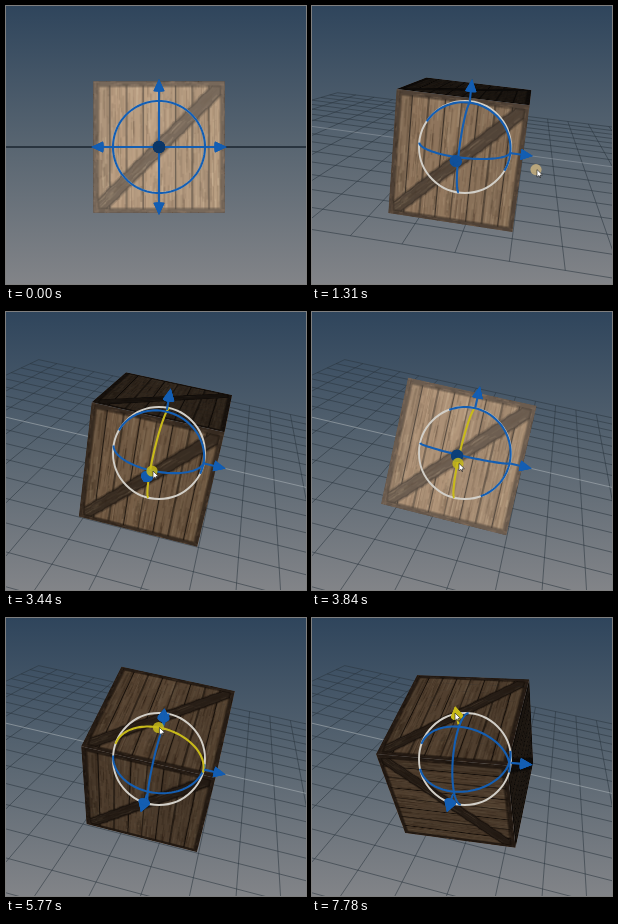
Animation, 300 px wide and 278 px high, one loop 8000 ms. Source, as an HTML page with a canvas:

```html
<!DOCTYPE html>
<html lang="en">
<head>
<meta charset="utf-8">
<title>Crate rotation gizmo</title>
<style>
html, body { margin: 0; width: 100%; height: 100%; overflow: hidden; background: #53616f; }
canvas { display: block; width: 100vw; height: 100vh; }
</style>
</head>
<body>
<canvas id="stage" width="300" height="278"></canvas>
<script>
const W = 300, H = 278, LOOP = 8000;
const CX = 153, CY = 141, FOCAL = 480, DIST = 8.3;
const RING = 46, GRID = 4, CELLS = 8, TEX = 132;
const BLUE = [20, 94, 178], YELLOW = [200, 186, 26], TAN = [200, 176, 126];
const ctx = document.getElementById('stage').getContext('2d');

const DRAGS = [
  { from: 250, to: 1800, color: TAN },
  { from: 3440, to: 4780, color: YELLOW },
  { from: 5770, to: 6700, color: YELLOW }
];
const HOVERS = [
  { from: 2430, to: 2900, part: 'ring1' },
  { from: 2900, to: 4850, part: 'ring0' },
  { from: 5300, to: 7100, part: 'ring2' },
  { from: 7560, to: LOOP, part: 'arrow0' }
];

const rad = d => d * Math.PI / 180;
const dot = (a, b) => a[0] * b[0] + a[1] * b[1] + a[2] * b[2];
const cross = (a, b) => [a[1] * b[2] - a[2] * b[1], a[2] * b[0] - a[0] * b[2], a[0] * b[1] - a[1] * b[0]];
const scale = (a, k) => a.map(v => v * k);
const add = (...list) => [0, 1, 2].map(i => list.reduce((s, v) => s + v[i], 0));
const mix = (a, b, k) => a.map((v, i) => v + (b[i] - v) * k);
const rgb = (c, k = 1) => `rgb(${c.map(v => Math.round(v * k))})`;
const active = (list, t) => list.find(s => t >= s.from && t < s.to);
const ramp = (t, from, to) => Math.min(1, Math.max(0, (t - from) / (to - from)));
const smooth = (t, from, to) => { const k = ramp(t, from, to); return k * k * (3 - 2 * k); };

// Turns two perpendicular vectors in their plane
function turn(a, b, deg) {
  const c = Math.cos(rad(deg)), s = Math.sin(rad(deg));
  return [add(scale(a, c), scale(b, s)), add(scale(b, c), scale(a, -s))];
}

function poseAt(t) {
  const orbit = Math.pow(ramp(t, 180, 1770), 1.6);
  return {
    yaw: 7 * Math.min(1, orbit * 2),
    pitch: 24 * orbit,
    roll: 10.3 * orbit,
    tilt: 44 * smooth(t, 3870, 4320) - 20 * smooth(t, 3440, 3800),
    spin: -78 * ramp(t, 5770, 6600)
  };
}

// Right, up and toward-viewer directions of the camera
function cameraRows({ yaw, pitch, roll }) {
  let [ahead, right] = turn([0, 0, 1], [1, 0, 0], yaw);
  let up = [0, 1, 0];
  [ahead, up] = turn(ahead, up, pitch);
  [right, up] = turn(right, up, roll);
  return [right, up, ahead];
}

function objectAxes({ tilt, spin }) {
  const [y, z] = turn([0, 1, 0], [0, 0, 1], tilt);
  return [...turn([1, 0, 0], y, spin), z];
}

const toView = (rows, p) => rows.map(r => dot(r, p));

function project(v) {
  const s = FOCAL / (DIST - v[2]);
  return [CX + v[0] * s, CY - v[1] * s];
}

function trace(pts, close) {
  ctx.beginPath();
  pts.forEach((p, i) => i ? ctx.lineTo(p[0], p[1]) : ctx.moveTo(p[0], p[1]));
  if (close) ctx.closePath();
}

function makeTexture() {
  const cv = document.createElement('canvas');
  cv.width = cv.height = TEX;
  const g = cv.getContext('2d');
  let seed = 7;
  const rnd = () => (seed = (seed * 16807) % 2147483647) / 2147483647;
  const planks = 8, pw = TEX / planks;

  const streaks = (n, x, y, w, h, len) => {
    for (let i = 0; i < n; i++) {
      g.fillStyle = rnd() < 0.55 ? `rgba(65,38,18,${0.1 + rnd() * 0.25})` : `rgba(245,212,168,${0.08 + rnd() * 0.25})`;
      g.fillRect(x + rnd() * w, y + rnd() * h, 0.6 + rnd() * 0.9, len * (0.4 + rnd()));
    }
  };

  for (let i = 0; i < planks; i++) {
    g.fillStyle = rgb([184, 144, 106], 0.93 + rnd() * 0.13);
    g.fillRect(i * pw, 0, pw + 1, TEX);
    streaks(80, i * pw, -10, pw, TEX, 22);
  }
  g.fillStyle = 'rgba(32,20,11,.88)';
  for (let i = 1; i < planks; i++) g.fillRect(i * pw - 0.6, 0, 1.2, TEX);

  g.save();
  g.translate(TEX / 2, TEX / 2);
  g.rotate(Math.PI / 4);
  const bar = (half, color) => {
    g.fillStyle = color;
    g.fillRect(-half, -TEX, half * 2, TEX * 2);
  };
  bar(8, 'rgba(30,18,10,.35)');
  bar(6.5, rgb([48, 33, 22]));
  bar(5.5, rgb([86, 65, 48]));
  g.globalAlpha = 0.55;
  streaks(160, -5.5, -TEX, 10, TEX * 2, 14);
  g.restore();

  const border = (width, color) => {
    g.strokeStyle = color;
    g.lineWidth = width;
    g.strokeRect(0, 0, TEX, TEX);
  };
  border(11, 'rgba(35,22,12,.6)');
  border(8, rgb([82, 61, 45]));
  for (let i = 0; i < 160; i++) {
    const d = rnd() * TEX, e = rnd() < 0.5 ? rnd() * 4 : TEX - rnd() * 4;
    g.fillStyle = rnd() < 0.5 ? 'rgba(40,24,12,.4)' : 'rgba(170,130,95,.35)';
    if (rnd() < 0.5) g.fillRect(d, e, 5, 1); else g.fillRect(e, d, 1, 5);
  }
  return cv;
}
const wood = makeTexture();

function drawBackground() {
  const g = ctx.createLinearGradient(0, 0, 0, H);
  g.addColorStop(0, '#2f455c');
  g.addColorStop(0.5, '#586571');
  g.addColorStop(1, '#828488');
  ctx.fillStyle = g;
  ctx.fillRect(0, 0, W, H);
}

function drawGrid(rows) {
  const line = (a, b) => {
    ctx.moveTo(...project(toView(rows, a)));
    ctx.lineTo(...project(toView(rows, b)));
  };
  ctx.lineWidth = 0.9;
  ctx.strokeStyle = 'rgba(42,53,63,.62)';
  ctx.beginPath();
  for (let i = -CELLS; i <= CELLS; i++) {
    const d = i * GRID / CELLS;
    if (i) line([-GRID, 0, d], [GRID, 0, d]);
    line([d, 0, -GRID], [d, 0, GRID]);
  }
  ctx.stroke();
  ctx.strokeStyle = `rgba(165,172,178,${2 * Math.min(0.35, rows[2][1])})`;
  ctx.beginPath();
  line([-GRID, 0, 0], [GRID, 0, 0]);
  ctx.stroke();
}

function drawFace(axes, i, side) {
  const N = scale(axes[i], side), U = axes[i ? 0 : 1], V = cross(N, U);
  if (N[2] * DIST <= 1) return;
  const at = (a, b) => project(add(N, scale(U, a * 2 - 1), scale(V, 1 - b * 2)));
  const outline = [at(0, 0), at(1, 0), at(1, 1), at(0, 1)];
  const cells = 10, part = TEX / cells;

  ctx.save();
  trace(outline, true);
  ctx.clip();
  for (let x = 0; x < cells; x++) for (let y = 0; y < cells; y++) {
    const p = at(x / cells, y / cells);
    const q = at((x + 1) / cells, y / cells);
    const r = at(x / cells, (y + 1) / cells);
    ctx.save();
    ctx.transform(q[0] - p[0], q[1] - p[1], r[0] - p[0], r[1] - p[1], p[0], p[1]);
    ctx.drawImage(wood, x * part, y * part, part, part, 0, 0, 1.06, 1.06);
    ctx.restore();
  }
  // Headlight: diffuse darkening, then a highlight
  trace(outline, true);
  ctx.fillStyle = `rgba(0,0,0,${1 - 0.62 * N[2]})`;
  ctx.fill();
  ctx.globalCompositeOperation = 'lighter';
  ctx.fillStyle = rgb([68, 66, 62], Math.pow(N[2], 22));
  ctx.fill();
  ctx.restore();
}

function drawRing(a, b, color) {
  const steps = 120;
  let pen = false;
  ctx.beginPath();
  for (let i = 0; i <= steps; i++) {
    const [p] = turn(a, b, i / steps * 360);
    const x = CX + p[0] * RING, y = CY - p[1] * RING;
    const front = p[2] >= -0.001;
    if (front) pen ? ctx.lineTo(x, y) : ctx.moveTo(x, y);
    pen = front;
  }
  ctx.strokeStyle = rgb(color);
  ctx.lineWidth = 2.1;
  ctx.stroke();
}

function drawArrow(dir, a, b, color) {
  if (dir[2] < -0.01) return;
  const tint = rgb(color, 1 - 0.42 * Math.pow(Math.max(0, dir[2]), 30));
  trace([0.8, 1].map(d => project(scale(dir, d))));
  ctx.strokeStyle = tint;
  ctx.lineWidth = 2.1;
  ctx.stroke();

  const sides = 16, tip = project(scale(dir, 1.17)), base = [];
  for (let i = 0; i < sides; i++) {
    const [p] = turn(a, b, i / sides * 360);
    base.push(project(add(scale(dir, 0.97), scale(p, 0.095))));
  }
  ctx.fillStyle = tint;
  trace(base, true);
  ctx.fill();
  base.forEach((p, i) => {
    trace([tip, p, base[(i + 2) % sides]], true);
    ctx.fill();
  });
}

function drawGizmo(axes, hover) {
  ctx.beginPath();
  ctx.arc(CX, CY, RING, 0, Math.PI * 2);
  ctx.strokeStyle = '#d2cfc8';
  ctx.lineWidth = 1.9;
  ctx.stroke();
  const tone = part => part === hover ? YELLOW : BLUE;
  const others = i => [axes[(i + 1) % 3], axes[(i + 2) % 3]];
  axes.forEach((_, i) => drawRing(...others(i), tone('ring' + i)));
  axes.forEach((axis, i) => {
    for (const side of [-1, 1]) drawArrow(scale(axis, side), ...others(i), tone('arrow' + i));
  });
}

// Each drag places the pointer from the pose; glides join the drags
function pointerAt(t, pose, axes) {
  const orbit = [245 - 3 * pose.yaw, 117 + 3.35 * pose.pitch];
  const tilt = [146, 159 + 0.38 * pose.tilt];
  const [grip] = turn(axes[0], axes[1], 95);
  const spin = [CX + grip[0] * RING, CY - grip[1] * RING];
  let p = mix(orbit, [170, 161], smooth(t, 1970, 2500));
  p = mix(p, tilt, smooth(t, 2840, 3040));
  p = mix(p, spin, smooth(t, 4780, 5440));
  return mix(p, [142, 95], smooth(t, 7040, 7700));
}

function drawPointer(t, [x, y]) {
  if (t < 180) return;
  const drag = active(DRAGS, t);
  if (drag) {
    ctx.beginPath();
    ctx.arc(x, y, 5.6, 0, Math.PI * 2);
    ctx.globalAlpha = 0.85;
    ctx.fillStyle = rgb(drag.color);
    ctx.fill();
    ctx.globalAlpha = 1;
  }
  const shape = [[0, 0], [0, 7.5], [1.8, 6], [3.4, 8.4], [3.1, 5.5], [5.4, 5.3]];
  trace(shape.map(p => [x + 1 + p[0], y + p[1]]), true);
  ctx.fillStyle = '#fff';
  ctx.strokeStyle = 'rgba(30,30,30,.8)';
  ctx.lineWidth = 0.8;
  ctx.fill();
  ctx.stroke();
}

function draw(t) {
  const pose = poseAt(t), rows = cameraRows(pose);
  const axes = objectAxes(pose).map(a => toView(rows, a));
  const hover = active(HOVERS, t);
  drawBackground();
  drawGrid(rows);
  axes.forEach((_, i) => {
    for (const side of [-1, 1]) drawFace(axes, i, side);
  });
  drawGizmo(axes, hover && hover.part);
  drawPointer(t, pointerAt(t, pose, axes));
}

const start = performance.now();
function frame() {
  draw((performance.now() - start) % LOOP);
  requestAnimationFrame(frame);
}
frame();
</script>
</body>
</html>
```
